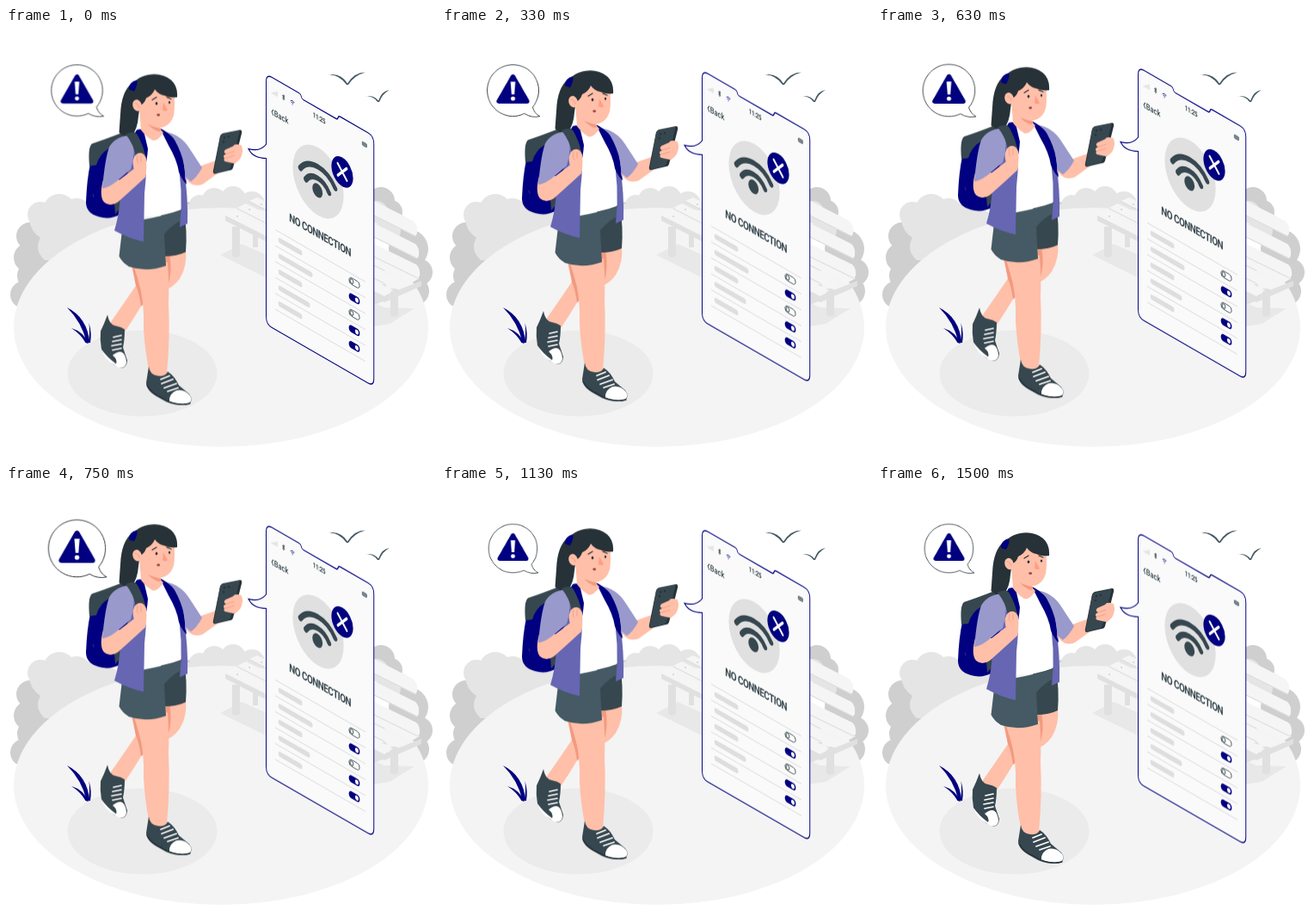
Write an HTML page that moves like this. It is 500 by 500 pixels and loops after 1540 ms.

```html
<!DOCTYPE html>
<html lang="en">
<head>
<meta charset="utf-8">
<title>No connection</title>
<style>
html, body { margin: 0; width: 100%; height: 100%; overflow: hidden; background: #fff; }
svg { display: block; width: 100vw; height: 100vh; }
.float { animation: float 1.54s linear -40ms infinite; }
.beat { transform-origin: 82.5px 73px; animation: beat 1.54s linear -40ms infinite; }
@keyframes float {
  0%, 100% { transform: translateY(0); }
  50% { transform: translateY(-10px); }
}
@keyframes beat {
  0%, 30%, 40%, 60%, 100% { transform: scale(1); }
  10%, 50% { transform: scale(1.2); }
}
.navy { fill: #000080; }
.dark { fill: #37474f; }
.ink { fill: #263238; }
.slate { fill: #455a64; }
.skin { fill: #ffbfa8; }
.shade { fill: #f29a80; }
.violet { fill: #6666b3; }
.lilac { fill: #9999cc; }
.white { fill: #fff; }
.line { fill: none; stroke-linecap: round; stroke-linejoin: round; }
text { font-family: Roboto, Arial, sans-serif; fill: #37474f; }
</style>
</head>
<body>
<svg viewBox="0 0 500 500">
  <!-- bushes -->
  <g fill="#cfcfcf">
    <circle cx="28" cy="242" r="16"/><circle cx="26" cy="267" r="17"/>
    <circle cx="30" cy="288" r="17"/><circle cx="21" cy="310" r="16"/>
    <circle cx="44" cy="262" r="22"/><circle cx="436" cy="201" r="16"/>
    <circle cx="447" cy="214" r="14"/><circle cx="456" cy="230" r="13"/>
    <circle cx="468" cy="257" r="23"/><circle cx="480" cy="284" r="16"/>
    <circle cx="475" cy="306" r="17"/><circle cx="214" cy="212" r="10"/>
  </g>
  <g fill="#e5e5e5">
    <circle cx="40" cy="217" r="15"/><circle cx="62" cy="212" r="19"/>
    <circle cx="82" cy="215" r="17"/><circle cx="100" cy="222" r="17"/>
    <circle cx="118" cy="228" r="17"/>
    <path d="M27 222H140V270H45Q32 258 40 244Q28 236 27 222Z"/>
    <circle cx="225" cy="206" r="12"/><circle cx="242" cy="200" r="14"/>
    <circle cx="264" cy="199" r="15"/><circle cx="286" cy="205" r="15"/>
    <path d="M205 205H310V235H205Z"/>
    <circle cx="431" cy="214" r="13"/><circle cx="444" cy="235" r="15"/>
  </g>
  <ellipse cx="250" cy="348" rx="241" ry="139" fill="#f4f4f4"/>
  <ellipse cx="158.5" cy="401.5" rx="87" ry="50" fill="#ebebeb"/>

  <!-- bench -->
  <path d="M249 264L274 251L440 325L475 326L446 344L420 348Z" fill="#e8e8e8"/>
  <g fill="#e0e0e0">
    <path d="M263 231H272V265L267 267L263 265Z"/>
    <path d="M287 241H293V255H287Z"/>
    <path d="M447 303H456V334L451 336L447 334Z"/>
    <path d="M428 298H442V316L428 322Z"/>
    <path d="M255 218V224L440 319L483 300V294L440 311Z"/>
  </g>
  <g fill="#f5f5f5">
    <path d="M255 217L265 211L450 305L440 312Z"/>
    <path d="M269 209L279 204L465 298L455 304Z"/>
    <path d="M283 201L292 197L481 291L470 297Z"/>
    <path d="M428 201L473 224Q479 228 478 239L476 242L428 218Z"/>
    <path d="M428 227L476 251Q481 255 480 265L478 268L428 243Z"/>
    <path d="M428 251L477 275Q482 279 481 288L479 291L428 266Z"/>
  </g>
  <path d="M428 218L476 242M428 243L478 268M428 266L479 291M269 210L440 297M283 202L440 282" class="line" stroke="#dedede" stroke-width="1.2"/>
  <g fill="#d0d0d0"><circle cx="283" cy="211" r="1"/><circle cx="269" cy="219" r="1"/><circle cx="297" cy="205" r="1"/></g>

  <!-- grass -->
  <g class="navy">
    <path d="M71 325Q95 337 97 366L93.5 365Q88 342 71 325Z"/>
    <path d="M76 349Q90 353 96 367L92.5 366Q87 356 76 349Z"/>
    <path d="M96.5 343Q100 355 98 366H95.5Q98 355 96.5 343Z"/>
  </g>

  <!-- birds -->
  <g class="slate">
    <path d="M375 54.5Q389 51.5 397 64.5Q405 51.5 418 51.5Q405 55 398 66H396Q387 53.5 375 54.5Z"/>
    <path d="M417 80Q427 77 433 84.5Q437 73 446 72Q438 76 434 86H432Q426 78 417 80Z"/>
  </g>

  <!-- alert bubble -->
  <g class="beat">
    <path d="M104 91Q106 98 112 101Q103 103 95 98A28.3 28.3 0 1 1 104 91Z" fill="#fff" stroke="#263238" stroke-width=".8"/>
    <path d="M82.5 57.5L67 84.5H98Z" fill="#000080" stroke="#000080" stroke-width="5" stroke-linejoin="round"/>
    <path class="white" d="M79.9 63H85.1L84 77H81Z"/><circle class="white" cx="82.5" cy="81.5" r="2.3"/>
  </g>

  <!-- walker -->
  <g class="float">
    <g transform="translate(0 1)">
      <!-- back leg -->
      <path class="skin" d="M186 258L209 258Q211 276 202 291Q193 303 184 304L157 323Q148 338 138 353L120 344Q132 327 151 299L146 277Z"/>
      <path class="shade" d="M186 262L190 262Q194 282 188 300L184 304Z"/>
      <path class="shade" d="M147 277L160 279L162 319L157 323Q155 308 151 299Z"/>
      <path class="dark" d="M118 333Q120 345 128 346Q134 347 138 350Q138 362 136 371L141 386Q140 397 132 394Q118 389 111 373Q109 362 110 352Q114 344 118 333Z"/>
      <path class="white" d="M124 380Q134 372 138 380Q142 389 138 393Q133 397 126 391Q115 386 111 373Q117 382 128 390Q130 385 124 380Z"/>
      <path class="line" stroke="#fff" stroke-width="1.7" d="M125 359L134 357M124 364L134 362M123 369L134 367M124 374L134 372"/>
      <!-- front leg -->
      <path class="skin" d="M148 274L188 272Q190 298 189 320Q191 358 187 402Q178 408 167 402Q161 372 160 348Q161 316 154 294Z"/>
      <path class="dark" d="M166 393Q167 403 177 404Q186 405 188 399Q196 404 201 415L213 425Q219 433 212 437Q196 441 179 430Q163 422 163 412Z"/>
      <path class="white" d="M190 434Q189 425 198 421Q207 419 214 427Q218 433 212 436Q202 438 190 434Z"/>
      <path class="line" stroke="#263238" stroke-width="1.4" d="M164 415Q169 424 182 430Q199 440 214 436"/>
      <path class="line" stroke="#fff" stroke-width="1.8" d="M180 408L190 404M181 413L194 408M184 418L198 413M188 422L200 418"/>

      <!-- shorts -->
      <path class="dark" d="M180 212L207 210Q211 237 209 260Q199 265 184 265Z"/>
      <path class="slate" d="M136 226Q169 222 207 211L207 222Q195 226 184 239L186 276Q164 284 143 277Q135 272 131.5 265Z"/>
    </g>

    <!-- backpack -->
    <path class="navy" d="M98 158Q101 141 112 137L150 134L158 185L133 217Q121 224 108 220Q93 216 93 203Q94 177 98 158Z"/>
    <path class="line" stroke="#33339a" stroke-width=".9" d="M101 194L102 197"/>
    <path class="dark" d="M97 161Q95 139 100 135Q115 130 133 123Q147 119 156 124L159 150L121 140Q109 146 105 160Z"/>
    <path class="dark" d="M162 170Q160 186 141 201L127 217L126 204L148 178Z"/>

    <!-- ponytail -->
    <path class="ink" d="M150 62Q136 70 133.5 94L131.5 122Q139 129 147 125Q153 117 154 103L158 72Z"/>

    <!-- far arm -->
    <path class="skin" d="M206 158L226 161L243 155L251 143L262 139L274 139Q276 146 272 153Q266 160 254 164L229 182Q220 186 213 180L204 170Z"/>
    <path class="lilac" d="M184 121Q203 124 213 140L228 163Q222 174 215 179L202 168Z"/>

    <!-- torso -->
    <path class="white" d="M159 121L184 119L199 140Q207 175 203 212Q180 221 157 219Z"/>
    <path class="violet" d="M203 140L207 166Q212 197 211 228L202 232Q207 190 198 145Z"/>
    <path class="navy" d="M179 117Q188 121 196 130Q206 142 207 160L210 182Q205 178 201 168Q199 154 189 137Z"/>
    <path class="lilac" d="M192 124Q205 131 212 145L211 169L208 178Q210 152 192 124Z"/>
    <path class="violet" d="M151 124L161 128Q165 162 161 193L160 249Q142 245 126 236Q132 217 133 193L148 150Z"/>
    <path class="navy" d="M152 119Q159 116 161 124L165 141Q164 155 161 164Q159 140 149 124Z"/>

    <!-- neck and face -->
    <path class="skin" d="M155 92L182 107L179 118L183 122Q176 133 170 131Q162 126 157 119Z"/>
    <path class="shade" d="M163 109Q172 117 180 117L179 121Q169 119 163 109Z"/>
    <path class="skin" d="M156 72L195 74Q197 90 195 102Q192 113 182 116Q170 117 162 110L154 94Z"/>
    <path class="ink" d="M146 71Q149 58 165 55Q181 52 192 61Q200 68 199 81Q190 82 184 79Q178 78 173 72Q170 79 163 82Q161 88 157 90L149 94Q144 82 146 71Z"/>
    <path class="navy" d="M143 72Q143 63 152 61Q154 65 149 74Z"/>
    <ellipse class="skin" cx="152.5" cy="90.5" rx="5.2" ry="6.8" transform="rotate(-15 152.5 90.5)"/>
    <path class="line" stroke="#f29a80" stroke-width=".8" d="M150 88Q154 88 155 93"/>
    <path class="line" stroke="#263238" stroke-width="1.3" d="M170 84L175 81M187 81L192 83"/>
    <ellipse class="ink" cx="175" cy="88.3" rx="1.3" ry="1.7"/>
    <ellipse class="ink" cx="190" cy="87" rx="1.2" ry="1.6"/>
    <path d="M183 87L188 96Q186 98 182 96Z" fill="#ff9d85"/>
    <ellipse cx="177.2" cy="101.5" rx="1.9" ry="1.5" fill="#9c4a4a"/>

    <!-- near arm -->
    <path class="skin" d="M113 177L132 177L149 164Q146 153 152 146Q159 141 162 149Q165 159 162 174Q148 187 130 203Q121 209 114 203Q108 196 113 177Z"/>
    <path class="lilac" d="M148 125Q128 125 120 139Q115 153 112 187Q121 186 132 176L145 165Q151 146 148 125Z"/>
    <path class="dark" d="M139 124Q149 119 153 125Q160 138 162 149L161 154Q156 145 151 151Q149 136 139 124Z"/>
    <path class="skin" d="M149 165Q145 153 152 147Q160 143 163 153L163 171L153 175Z"/>
    <path class="line" stroke="#f29a80" stroke-width=".8" d="M153 149Q151 155 154 158M157 149L157 156"/>

    <!-- handset -->
    <path class="ink" d="M252 123L272 119Q275 119 274 123L264 163Q263 166 260 166L243 170Q240 170 241 166L249 126Q250 124 252 123Z"/>
    <path class="dark" d="M251 124L270 120Q272 120 271 123L261 163Q260 165 257 166L243 169Q241 169 242 166L249 127Z"/>
    <g class="ink"><circle cx="254" cy="128" r="1.3"/><circle cx="253" cy="133" r="1.3"/><circle cx="259" cy="127" r="1.2"/></g>
    <path class="skin" d="M274 137Q266 134 264 138L255 142Q252 145 256 147Q251 149 254 152Q252 155 256 156L265 158Q274 153 275 143Z"/>
    <path class="line" stroke="#f29a80" stroke-width=".8" d="M256 147L265 144M255 152L265 149"/>
  </g>

  <!-- screen -->
  <g class="float">
    <g transform="matrix(.75 .433 0 1 302.5 54)">
      <path d="M9 0H51Q54 0 54.5 2.5Q55 5 58 5H108Q111 5 111.5 2.5Q112 0 115 0H158Q167 0 167 9V282Q167 291 158 291H9Q0 291 0 282V9Q0 0 9 0Z" fill="#fafafa" stroke="#000080" stroke-width="1.3"/>
      <path d="M8.5 17.5H10V19H8.5ZM11 16H12.5V19H11ZM13.5 14.5H15V19H13.5ZM16 13H17.5V19H16Z" fill="#d8d8d8"/>
      <path class="line" stroke="#37474f" stroke-width=".8" d="M25.5 14L28.5 17L27 18.5V12.5L28.5 14L25.5 17"/>
      <path class="line" stroke="#000080" stroke-width=".8" d="M38 14.5Q40.7 11.8 43.4 14.5M39.3 16Q40.7 14.7 42.1 16M40.7 17.8V18"/>
      <text x="82" y="18.6" text-anchor="middle" font-size="8.2" font-weight="700" letter-spacing="-.3">11:25</text>
      <rect x="149" y="13.8" width="7" height="4.4" rx="1" fill="#78868c" stroke="#37474f" stroke-width=".5"/>
      <path class="line" stroke="#37474f" stroke-width="1.2" d="M11 37L8.8 40L11 43"/>
      <text x="12.3" y="43.4" font-size="10" font-weight="500">Back</text>

      <circle cx="80.7" cy="90.2" r="39.5" fill="#e0e0e0"/>
      <circle class="dark" cx="79.6" cy="101" r="7.9"/>
      <path class="line" stroke="#37474f" stroke-width="6.6" d="M53 86.5A34 34 0 0 1 107 86.5M61.5 96A22 22 0 0 1 97.5 96"/>
      <circle class="navy" cx="118" cy="62.8" r="16.8"/>
      <path class="line" stroke="#fff" stroke-width="3" d="M111 55.8L125 69.8M125 55.8L111 69.8"/>
      <text x="83.5" y="155.6" text-anchor="middle" font-size="13.2" font-weight="700" letter-spacing="-.65">NO CONNECTION</text>

      <path stroke="#dcdcdc" stroke-width="1" d="M14 175H154M14 193.5H154M14 212H154M14 230.5H154M14 249H154M14 267.5H154"/>
      <path class="line" stroke="#dedede" stroke-width="6.2" d="M22 184.5H53M22 203H69M22 221.5H53M22 240H65M22 258.5H53"/>
      <defs>
        <g id="off"><rect x="128.6" y="-3.8" width="16.2" height="7.6" rx="3.8" fill="#fff" stroke="#37474f" stroke-width=".9"/><circle cx="132.6" r="2.6" fill="#fff" stroke="#37474f" stroke-width="1"/></g>
        <g id="on"><rect class="navy" x="128.2" y="-4.2" width="17" height="8.4" rx="4.2"/><circle class="white" cx="140.6" r="2.7"/></g>
      </defs>
      <use href="#off" y="183.6"/><use href="#on" y="202.1"/><use href="#off" y="220.6"/>
      <use href="#on" y="239.1"/><use href="#on" y="257.6"/>
    </g>
    <path d="M303 135Q296 145 282 141Q287 152 303 152" fill="#fafafa" stroke="#000080" stroke-width="1.1"/>
  </g>
</svg>
</body>
</html>
```
